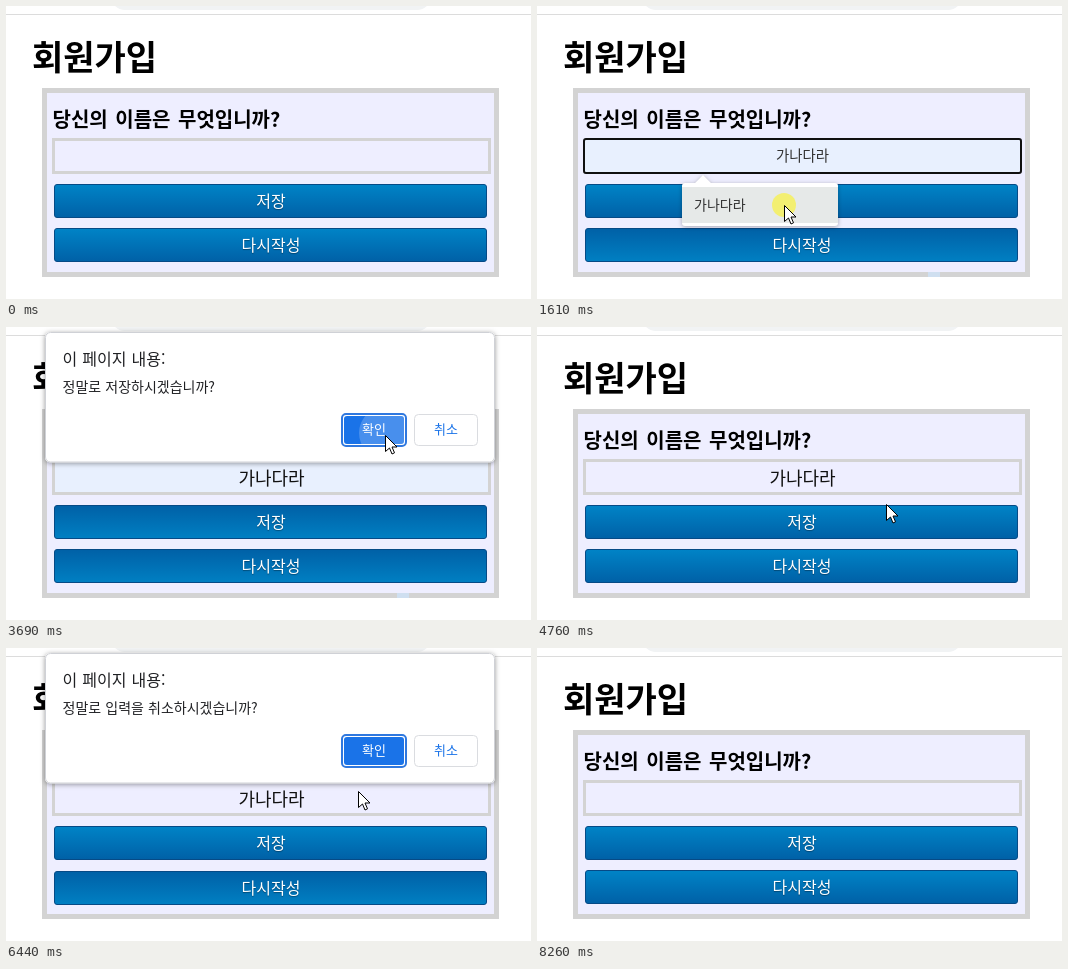
These frames come from a looping animation (525x293 px, 8.92 s). An HTML page with a canvas:

```html
<!DOCTYPE html>
<html lang="ko">
<head>
<meta charset="utf-8">
<title>회원가입</title>
<style>
  html, body { margin: 0; width: 100%; height: 100%; overflow: hidden; background: #fff; }
  canvas { display: block; }
</style>
</head>
<body>
<canvas id="stage" width="525" height="293"></canvas>
<script>
const ctx = document.getElementById('stage').getContext('2d');
const LOOP = 8920;
const FONT = '"Noto Sans CJK KR", "Noto Sans CJK", sans-serif';

// Pointer path: time, x, y
const PATH = [
  [280, 405, 300], [480, 391, 264], [940, 262, 148], [1280, 262, 148],
  [1610, 247, 199], [1800, 247, 199], [2010, 255, 200], [2150, 255, 200],
  [2540, 262, 199], [3090, 262, 199], [3690, 379, 108], [4220, 379, 108],
  [4360, 349, 177], [5360, 349, 177], [5850, 322, 239], [6310, 322, 238],
  [6440, 352, 143], [6780, 387, 100], [6980, 387, 100], [7330, 380, 106],
  [7790, 380, 106], [8260, 470, 300]
];
const CLICKS = [[840, 960], [1580, 1800], [2470, 2660], [3740, 3850], [5860, 6030], [6740, 6980]];
const DIALOGS = [
  { from: 2670, to: 3890, press: 3640, message: '정말로 저장하시겠습니까?' },
  { from: 6060, to: 7150, press: 6800, message: '정말로 입력을 취소하시겠습니까?' }
];

const clamp = v => Math.max(0, Math.min(1, v));
const within = (t, a, b) => t >= a && t < b;

function pointerAt(t) {
  const next = PATH.findIndex(key => key[0] > t);
  if (next < 0) return PATH.at(-1).slice(1);
  if (next === 0) return PATH[0].slice(1);
  const [a, ax, ay] = PATH[next - 1], [b, bx, by] = PATH[next];
  const p = (t - a) / (b - a);
  return [ax + (bx - ax) * p, ay + (by - ay) * p];
}

function box(x, y, w, h, r, fill, stroke, line = 1) {
  ctx.beginPath();
  ctx.roundRect(x, y, w, h, r);
  if (fill) { ctx.fillStyle = fill; ctx.fill(); }
  if (stroke) { ctx.strokeStyle = stroke; ctx.lineWidth = line; ctx.stroke(); }
}

function disc(x, y, r, fill) {
  ctx.beginPath();
  ctx.arc(x, y, r, 0, Math.PI * 2);
  ctx.fillStyle = fill;
  ctx.fill();
}

// Text is placed by the vertical middle of its Hangul glyphs.
function text(str, x, middle, size, { color = '#000', weight = 400, align = 'left', space = 0 } = {}) {
  ctx.font = `${weight} ${size}px ${FONT}`;
  ctx.textAlign = align;
  ctx.wordSpacing = space + 'px';
  ctx.fillStyle = color;
  ctx.fillText(str, x, middle + size * 0.37);
}

function shadowed(color, blur, dy, draw) {
  ctx.save();
  ctx.shadowColor = color;
  ctx.shadowBlur = blur;
  ctx.shadowOffsetY = dy;
  draw();
  ctx.restore();
}

function button(label, y, hover, pressed) {
  if (pressed) y++;
  const fill = ctx.createLinearGradient(0, y, 0, y + 34);
  fill.addColorStop(0, hover ? '#0060a6' : '#0084c7');
  fill.addColorStop(1, hover ? '#0080c3' : '#0060a6');
  box(48.5, y + 0.5, 432, 33, 2.5, fill, '#064a86');
  shadowed('rgba(0,0,0,.35)', 1, 1, () =>
    text(label, 265, y + 17, 16, { color: '#fff', align: 'center' }));
}

function page() {
  ctx.fillStyle = '#fff';
  ctx.fillRect(0, 0, 525, 293);
  box(105, -24, 320, 28, 14, '#f1f3f4');
  ctx.fillStyle = '#dcdcdc';
  ctx.fillRect(0, 8, 525, 1);
  text('회원가입', 26, 51, 34, { weight: 700 });
  box(38.5, 84.5, 452, 184, 0, '#eeeeff', '#d3d3d3', 5);
  text('당신의 이름은 무엇입니까?', 46.5, 114, 20, { weight: 700, space: 3 });
}

function nameField(t) {
  const fill = within(t, 1590, 4700) ? '#e8f0fe' : '#eeeeff';
  if (within(t, 870, 2480)) box(47, 133, 437, 34, 2, fill, '#101010', 2);
  else box(47.5, 133.5, 436, 33, 0, fill, '#d3d3d3', 3);
  if (within(t, 1590, 1830)) text('가나다라', 265.5, 150, 14.4, { color: '#333', align: 'center' });
  if (within(t, 1830, 7200)) text('가나다라', 265.5, 151, 18, { color: '#111', align: 'center' });
}

function suggestions(active) {
  shadowed('rgba(0,0,0,.3)', 4, 1, () => {
    ctx.beginPath();
    ctx.roundRect(145, 177, 156, 43, 3);
    ctx.moveTo(157, 178);
    ctx.lineTo(166, 169);
    ctx.lineTo(175, 178);
    ctx.fillStyle = '#fff';
    ctx.fill();
  });
  if (active) box(145, 181, 156, 36, 0, '#e6e9e8');
  text('가나다라', 157, 199, 14, { color: '#333' });
}

function dialog(t, { from, to, press, message }) {
  if (!within(t, from, to)) return;
  const shown = 1 - (1 - clamp((t - from) / 190)) ** 3;
  ctx.save();
  ctx.globalAlpha = shown * clamp((to - t) / 100);
  ctx.translate(0, -26 * (1 - shown));
  shadowed('rgba(0,0,0,.4)', 5, 1, () => box(39, 5, 450, 130.5, 5, '#fff'));
  box(39.5, 5.5, 449, 129.5, 5, null, '#cfd1d6');
  text('이 페이지 내용:', 56.5, 32, 16, { color: '#202124', space: 1.5 });
  text(message, 56.5, 60, 14, { color: '#202124', space: 1 });
  box(336, 87, 64, 32, 4, '#fff', '#2f78df', 2);
  box(338, 89, 60, 28, 3, '#1a73e8');
  if (t > press) {
    ctx.save();
    ctx.beginPath();
    ctx.roundRect(338, 89, 60, 28, 3);
    ctx.clip();
    disc(379, 106, 26, 'rgba(255,255,255,.2)');
    ctx.restore();
  }
  text('확인', 368, 102, 13, { color: '#fff', weight: 500, align: 'center' });
  box(408.5, 87.5, 63, 31, 4, '#fff', '#dadce0');
  text('취소', 440, 102, 13, { color: '#1a73e8', align: 'center' });
  ctx.restore();
}

function pointer(x, y, beam) {
  ctx.save();
  ctx.translate(Math.round(x) + 0.5, Math.round(y) + 0.5);
  ctx.lineWidth = 1;
  ctx.strokeStyle = '#000';
  const shape = new Path2D(beam
    ? 'M-3 -9h2l1 1l1 -1h2M0 -8V8M-3 9h2l1 -1l1 1h2'
    : 'M0 0V16L4 12.5L6.5 18.5L9 17.3L6.5 11.5H11.5Z');
  if (!beam) { ctx.fillStyle = '#fff'; ctx.fill(shape); }
  ctx.stroke(shape);
  ctx.restore();
}

function draw(t) {
  const [x, y] = pointerAt(t);
  const popup = within(t, 870, 1830);
  const blocked = popup || DIALOGS.some(d => within(t, d.from, d.to));
  const over = (top, bottom) => !blocked && x > 48 && x < 481 && y >= top && y < bottom;

  page();
  if (within(t, 560, 4700)) {
    ctx.fillStyle = '#cfdff0';
    ctx.fillRect(391, 266, 12, 5);
  }
  nameField(t);
  button('저장', 178, within(t, 1850, 4290) || over(178, 212), within(t, 2500, 3090));
  button('다시작성', 222, within(t, 560, 4700) || within(t, 5800, 7250) || over(222, 256),
    within(t, 5950, 7200));
  if (popup) suggestions(y > 180);
  DIALOGS.forEach(d => dialog(t, d));
  if (CLICKS.some(([a, b]) => within(t, a, b))) disc(x, y, 12, 'rgba(246,241,80,.78)');
  if (t >= 280) pointer(x, y, y > 134 && y < 166 && within(t, 280, 1500));
}

function frame() {
  draw(performance.now() % LOOP);
  requestAnimationFrame(frame);
}
frame();
</script>
</body>
</html>
```
